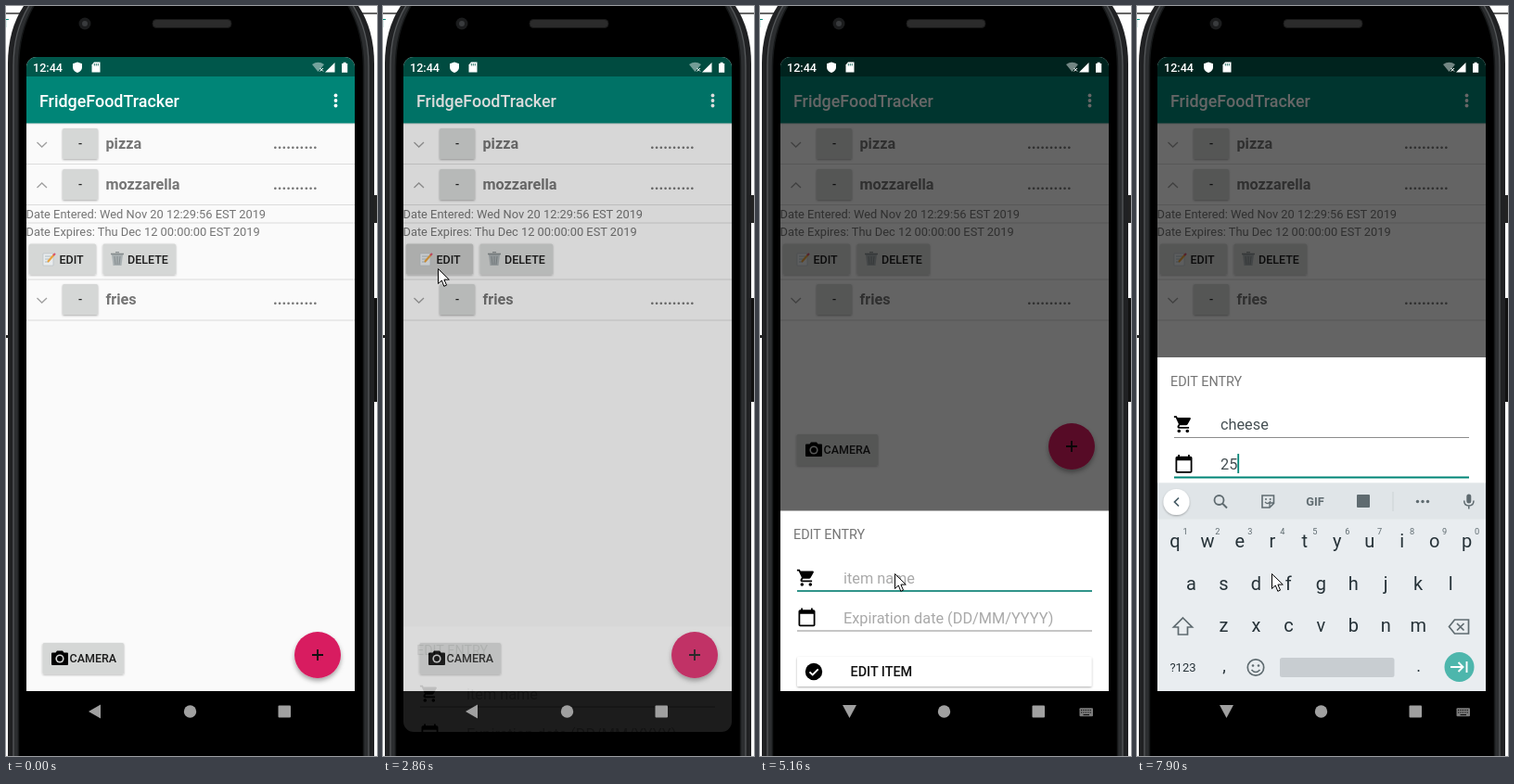
Write an HTML page that moves like this. It is 400x809 px and loops after 8000 ms.

```html
<!DOCTYPE html>
<html lang="en">
<head>
<meta charset="utf-8">
<title>Fridge list</title>
<style>
html, body { margin: 0; width: 100%; height: 100%; overflow: hidden; background: #fff; }
svg { display: block; width: 400px; height: 809px; }
text { font-family: Roboto, "Noto Sans", sans-serif; white-space: pre; }
</style>
</head>
<body>
<svg id="stage" viewBox="0 0 400 809" xmlns="http://www.w3.org/2000/svg"></svg>
<script>
const LOOP = 8000;
const KEYBOARD_HEIGHT = 225;
const stage = document.getElementById('stage');

// Markup helpers
const rect = (x, y, w, h, fill, extra = '') =>
  `<rect x="${x}" y="${y}" width="${w}" height="${h}" fill="${fill}" ${extra}/>`;
const circle = (x, y, r, fill, extra = '') =>
  `<circle cx="${x}" cy="${y}" r="${r}" fill="${fill}" ${extra}/>`;
const shape = (d, fill, extra = '') => `<path d="${d}" fill="${fill}" ${extra}/>`;
const line = (d, color, width = 1, extra = '') =>
  `<path d="${d}" fill="none" stroke="${color}" stroke-width="${width}" ${extra}/>`;
const text = (x, y, size, fill, value, extra = '') =>
  `<text x="${x}" y="${y}" font-size="${size}" fill="${fill}" ${extra}>${value}</text>`;
const group = (id, body, extra = '') => `<g id="${id}" ${extra}>${body}</g>`;
const icon = (x, y, d) => shape(d, '#000', `transform="translate(${x} ${y}) scale(.9)"`);
const BOLD = 'font-weight="700"';
const MEDIUM = 'font-weight="500"';
const CENTER = 'text-anchor="middle"';
const button = (x, y, w, h, extra = '') =>
  rect(x, y, w, h, '#d5d7d6', `rx="1.5" filter="url(#lift)" ${extra}`);

const defs = `<defs>
  <filter id="lift" x="-20%" y="-20%" width="140%" height="150%">
    <feDropShadow dx="0" dy="1" stdDeviation="0.9" flood-opacity=".32"/></filter>
  <filter id="float" x="-30%" y="-30%" width="160%" height="170%">
    <feDropShadow dx="0" dy="3" stdDeviation="2.5" flood-opacity=".35"/></filter>
  <clipPath id="display"><rect x="22" y="55" width="354" height="728" rx="11"/></clipPath>
  <clipPath id="window"><path d="M22 739V66A11 11 0 0 1 33 55H365A11 11 0 0 1 376 66V739Z"/></clipPath>
</defs>`;

function phone() {
  const outline = i =>
    `M${i} 815V${62 + i * .3}Q${i} ${22 + i * .3} ${20 + i * .9} -4` +
    `H${379 - i * .9}Q${399 - i} ${22 + i * .3} ${399 - i} ${62 + i * .3}V815Z`;
  return rect(0, 0, 400, 809, '#fff') +
    text(-4, 23, 12, '#00897b', 'T') +
    line('M0 8H400', '#333', 1.5) +
    rect(0, 355, 2, 3, '#222') + rect(397, 204, 3, 30, '#222') + rect(397, 315, 3, 112, '#111') +
    shape(outline(2), '#202123') +
    shape(outline(8), '#2c2e30', 'stroke="#55585a" stroke-width="1.3"') +
    shape(outline(13.5), '#000', 'stroke="#17191a" stroke-width="1.5"') +
    circle(85, 19, 6.5, '#1b1c1d') + circle(85, 19, 3, '#393b3d') +
    rect(158, 14.5, 85, 9, '#2b2b2b', 'rx="4" stroke="#171717"');
}

function listRow(top, name, open) {
  const y = top + 22;
  const tip = open ? -2.5 : 2.5;
  return line(`M33.5 ${y - tip + .5}L38.7 ${y + tip + .5}L44 ${y - tip + .5}`, '#a0a0a0', 1.3) +
    button(61, top + 5, 38, 33) +
    text(80, top + 26, 12.6, '#222', '-', `${MEDIUM} ${CENTER}`) +
    text(107.5, top + 27, 16.2, '#757575', name, BOLD) +
    text(288, top + 27, 16.4, '#757575', '..........', BOLD);
}

function app() {
  const dividers = [170.5, 214.5, 234, 295, 339]
    .map(y => line(`M22 ${y}H376`, '#dcdcdc', 1.2)).join('');
  const memo = shape('M40 267H51V280H40Z', '#e9ecee', 'stroke="#b9c0c4" stroke-width=".7"') +
    line('M42 270H49M42 273H48M42 276H46', '#90a4ae', .7) +
    line('M45 276L52 268', '#e9a23b', 2) + line('M51 269L53 267', '#d9536f', 2.2);
  const bin = shape('M114 268H126L124.5 280H115.5Z', '#a9b0b2') +
    line('M117 270L118 279M120 270V279M123 270L122 279', '#7d8587', .8) +
    line('M113 267.5H127', '#858c8e', 1.6) + line('M118 265.7H122', '#858c8e', 1.2);
  const cameraIcon = shape('M50 697.5H53.5L55 695.5H61L62.5 697.5H66Q67 697.5 67 698.5V710' +
    'Q67 711 66 711H50Q49 711 49 710V698.5Q49 697.5 50 697.5Z', '#000') +
    circle(58, 704, 4.6, '#d5d7d6') + circle(58, 704, 3, '#000');
  return rect(22, 55, 354, 684, '#fafafa') +
    rect(22, 55, 354, 21.5, '#00574b') + rect(22, 76, 354, 50.5, '#008577') +
    rect(22, 126.5, 354, 1, '#000', 'opacity=".12"') +
    text(36, 109, 17.9, '#fff', 'FridgeFoodTracker', MEDIUM) +
    [96.5, 102, 107.5].map(y => circle(355.5, y, 1.9, '#fff')).join('') +
    dividers + listRow(127, 'pizza') + listRow(171, 'mozzarella', true) + listRow(295, 'fries') +
    text(21.5, 229, 12.85, '#757575', 'Date Entered: Wed Nov 20 12:29:56 EST 2019') +
    text(21.5, 247.5, 12.85, '#757575', 'Date Expires: Thu Dec 12 00:00:00 EST 2019') +
    button(25, 256.5, 72, 33, 'id="edit"') + memo + text(57.5, 277.5, 12.5, '#1c1c1c', 'EDIT', MEDIUM) +
    button(104.5, 256.5, 78.5, 33) + bin + text(131, 277.5, 12.5, '#1c1c1c', 'DELETE', MEDIUM) +
    group('floating',
      button(39.5, 687, 87.5, 33.5) + cameraIcon + text(68.5, 708, 12.5, '#1c1c1c', 'CAMERA', MEDIUM) +
      circle(336, 700, 25, '#d81b60', 'filter="url(#float)"') +
      line('M330 700H342M336 694V706', '#111', 1.8));
}

function statusIcons() {
  return text(29, 70.5, 12.6, '#fff', '12:44', MEDIUM) +
    shape('M77 60.5L82 62.3V66Q82 70 77 72Q72 70 72 66V62.3Z', '#fff') +
    shape('M95 60.5H101.5V71.5H92.5V63.5Z', '#fff') +
    line('M95.3 62V64.5M97.3 62V64.5M99.3 62V64.5', '#00574b', .8) +
    shape('M330 63Q336.5 58.5 343 63L336.5 71Z', '#fff', 'opacity=".45"') +
    line('M338.5 67L342 70.5M342 67L338.5 70.5', '#fff', 1) +
    shape('M354.5 61V71.5H344Z', '#fff') +
    shape('M362 62H363.6V60.7H366.6V62H368.2V71.7H362Z', '#fff');
}

function sheet() {
  const cart = icon(39, 606, 'M1 2H4.3L5.2 4H20Q21.5 4.3 20.9 5.5L17.3 12Q16.7 13 15.5 13H8.1L7.2 14.6' +
    'V15H19V17H7Q4.4 16.6 5.2 14L6.6 11.6L3 4H1Z') +
    circle(45.3, 624, 1.8, '#000') + circle(54.3, 624, 1.8, '#000');
  const calendar = icon(39.7, 648.5, 'M20 3H19V1H17V3H7V1H5V3H4Q2 3 2 5V21Q2 23 4 23H20Q22 23 22 21V5' +
    'Q22 3 20 3ZM20 21H4V8H20Z').replace('<path', '<path fill-rule="evenodd"');
  return rect(22, 544.5, 354, 194.5, '#fff', 'id="paper"') +
    text(36, 575, 14.4, '#757575', 'EDIT ENTRY') +
    cart + text(90, 622.5, 16.3, '#a9a9a9', 'item name', 'id="name"') +
    line('M40 631H358', '#8c8c8c', 1) + line('', '#008577', 1.6, 'id="nameLine"') +
    calendar + text(90, 665.5, 16.3, '#a9a9a9', 'Expiration date (DD/MM/YYYY)', 'id="date"') +
    line('M40 674H358', '#8c8c8c', 1) + line('M40 674H358', '#008577', 2, 'id="dateLine"') +
    line('', '#4b5b60', 1, 'id="composing"') + rect(0, 605, 1.8, 21, '#008577', 'id="caret"') +
    rect(40, 702, 317.5, 32, '#fff', 'rx="1.5" filter="url(#lift)"') +
    circle(58, 718, 9.2, '#000') + line('M53.5 718.3L56.7 721.5L62.7 715.3', '#fff', 1.8) +
    text(97.5, 723, 14.4, '#111', 'EDIT ITEM', MEDIUM);
}

function keyboard() {
  const ink = '#263238', soft = '#5f6b70';
  const keys = (letters, x, y) => [...letters]
    .map((c, i) => text(x + i * 34.95, y, 20, ink, c, CENTER)).join('');
  const digits = [...'1234567890']
    .map((c, i) => text(52 + i * 34.95, 570, 9.2, soft, c, CENTER)).join('');
  const words = [100.5, 197.5, 294.5]
    .map((x, i) => text(x, 541, 16.2, '#566168', '', `id="word${i}" ${CENTER}`)).join('');
  const tools = circle(88.5, 533, 5, 'none', `stroke="${soft}" stroke-width="1.8"`) +
    line('M92 536.5L97 541.5', soft, 2) +
    shape('M135 528H147.5V536.5L143 541H135Z', 'none', `stroke="${soft}" stroke-width="1.6"`) +
    line('M147.5 536H143V541M138 535Q141 538.5 144 534', soft, 1.3) +
    circle(139, 532, 1, soft) + circle(143.7, 532, 1, soft) +
    text(192, 539, 12.8, soft, 'GIF', `${BOLD} ${CENTER}`) +
    rect(237, 527, 14, 14, soft, 'rx="1"') +
    line('M276 524V545', '#ccd2d5') +
    [302.5, 308, 313.5].map(x => circle(x, 534.5, 1.7, soft)).join('');
  return rect(22, 514.5, 354, 224.5, '#e9edf0') + rect(22, 514.5, 354, 39, '#e0e5e8') +
    circle(42.5, 535, 14, '#fff', 'filter="url(#lift)"') + line('', '#455a64', 1.7, 'id="chevron"') +
    group('suggestions', words + line('M146.5 524V545M249.5 524V545', '#c8ced1')) +
    group('tools', tools) +
    rect(355.3, 526.5, 5, 10, soft, 'rx="2.5"') +
    line('M352.7 533.5Q352.7 539 357.8 539Q363 539 363 533.5M357.8 539V542.5', soft, 1.5) +
    keys('qwertyuiop', 41, 584) + digits + keys('asdfghjkl', 58.5, 629.5) + keys('zxcvbnm', 93.5, 675) +
    shape('M49.5 660L59.5 670H54.5V678H44.5V670H39.5Z', 'none', `stroke="${soft}" stroke-width="1.7"`) +
    shape('M342.5 662H357.5V677H342.5L336.5 669.5Z', 'none', `stroke="${soft}" stroke-width="1.7"`) +
    line('M345 666L352.5 673.5M352.5 666L345 673.5', soft, 1.7) +
    text(49.5, 718, 13, ink, '?123', CENTER) + text(94, 718, 18, ink, ',', CENTER) +
    circle(128, 713.5, 8.7, 'none', `stroke="${soft}" stroke-width="1.7"`) +
    circle(125, 711.5, 1.3, soft) + circle(131, 711.5, 1.3, soft) +
    line('M123.5 716Q128 721 132.5 716', soft, 1.6) +
    rect(154, 703, 123.5, 21, '#c8cdd1', 'rx="2.5"') + text(303.5, 718, 18, ink, '.', CENTER) +
    circle(347.5, 713, 16, '#4db6ac') +
    line('M338 713H351M346.5 708L351.5 713L346.5 718M355.5 707V719', '#fff', 1.9);
}

function navigation() {
  const grey = '#a0a0a0';
  const imeKeys = line('M346 759.5H358M346 762H358', '#000', 1.2, 'stroke-dasharray="1.2 1.2"') +
    line('M348.5 764.6H355', '#000', 1);
  return shape('', grey, 'id="back"') + circle(198.5, 761, 6.7, grey) +
    rect(293.5, 754.5, 13.5, 13, grey, 'rx="1"') +
    group('ime', rect(344.5, 757.3, 14.5, 9, '#7c7c7c', 'rx="1"') + imeKeys);
}

stage.innerHTML = defs + phone() +
  group('app', app(), 'clip-path="url(#window)"') +
  group('dim', rect(22, 55, 354, 728, '#000'), 'clip-path="url(#display)"') +
  statusIcons() +
  `<g clip-path="url(#display)">${group('sheet', sheet())}</g>` +
  `<g clip-path="url(#window)">${group('keyboard', keyboard())}</g>` +
  navigation() +
  shape('M0 0V16L3.8 12.5L6.3 18.8L9 17.6L6.4 11.6H11.8Z', '#fff',
    'id="pointer" stroke="#000" stroke-width="1" stroke-linejoin="round"');

const el = {};
stage.querySelectorAll('[id]').forEach(node => { el[node.id] = node; });
const set = (id, attrs) => {
  for (const key in attrs) el[id].setAttribute(key, attrs[key]);
};
const show = (id, on) => { el[id].style.display = on ? '' : 'none'; };
const write = (id, value) => { if (el[id].textContent !== value) el[id].textContent = value; };

// Value of the latest [time, value] entry that has started
const held = (t, first, ...entries) =>
  entries.reduce((value, [start, next]) => t >= start ? next : value, first);

function glide(t, start, from, to) {
  const p = Math.min(10, Math.floor((t - start) / 77)) / 10;
  const eased = p * p * (3 - 2 * p) * .6 + p * .4;
  return from.map((v, i) => v + (to[i] - v) * eased);
}

function pointerAt(t) {
  if (t < 1370) return glide(t, 520, [284, 758], [63.5, 294]);
  if (t < 3460) return held(t, [66, 286.5], [1440, [66.5, 290]], [1840, [62, 285.5]], [1910, [59.5, 283.5]]);
  return glide(t, 3460, [59.5, 283.5], [145.5, 612.5]);
}

function drawFields(t) {
  const name = held(t, '', [5360, 'c'], [5430, 'ch'], [5540, 'che'], [5690, 'chee'], [5860, 'chees'], [6010, 'cheese']);
  const date = held(t, '', [7640, '2'], [7900, '25']);
  const onDate = t >= 6640;
  write('name', name || 'item name');
  write('date', date || 'Expiration date (DD/MM/YYYY)');
  set('name', { fill: name ? '#454f53' : '#a9a9a9' });
  set('date', { fill: date ? '#454f53' : '#a9a9a9' });

  const reach = held(t, 0, [4310, .35], [4380, .75], [4460, 1]);
  set('nameLine', {
    d: `M${150 - 110 * reach} 631H${150 + 208 * reach}`,
    'stroke-width': t >= 5300 ? 2 : 1.6
  });
  show('nameLine', reach > 0 && !onDate);
  show('dateLine', onDate);

  const typed = onDate ? date : name;
  const width = typed ? el[onDate ? 'date' : 'name'].getComputedTextLength() : 0;
  set('caret', { x: 90 + width, y: onDate ? 648.5 : 605 });
  show('caret', t >= 5300);
  set('composing', { d: `M90 625H${90 + width}` });
  show('composing', name && !onDate);
}

function drawKeyboard(t) {
  set('keyboard', {
    transform: `translate(0 ${held(t, KEYBOARD_HEIGHT, [5220, 110], [5300, 25], [5360, 0])})`
  });
  show('keyboard', t >= 5220);
  const words = held(t, '  ', [5360, 'c can call'], [5430, 'ch check chat'], [5540, 'che check cheers'],
    [5690, 'chee cheer cheese'], [5860, 'chees cheese cheesy'], [6010, 'cheese cheeses cheesecake']);
  words.split(' ').forEach((word, i) => write('word' + i, word));
  const toolbar = t < 5360 || t >= 6960;
  show('suggestions', !toolbar);
  show('tools', toolbar);
  set('tools', { opacity: t < 5360 ? 1 : held(t, 0, [6960, .3], [7040, .7], [7110, 1]) });
  set('chevron', { d: toolbar ? 'M45 530.5L40.5 535L45 539.5' : 'M40.5 530.5L45 535L40.5 539.5' });
}

function draw(t) {
  set('edit', { fill: held(t, '#d5d7d6', [2230, '#d1d3d2'], [2300, '#cdcfce'], [2380, '#cacbca'], [2450, '#c8c9c8'], [3080, '#d5d7d6']) });
  set('floating', { transform: `translate(0 ${t >= 5140 ? -KEYBOARD_HEIGHT : 0})` });
  set('dim', { opacity: held(t, 0, [2860, .14], [2930, .42], [3000, .6]) });

  const drop = held(t, 125, [2860, 125], [2930, 34], [3000, 0]);
  const pan = held(t, 0, [5220, 62], [5300, 108], [5360, 122.5], [6640, 142], [6720, 158], [6790, 165.5]);
  set('sheet', {
    transform: `translate(0 ${drop - pan})`,
    opacity: held(t, 0, [2860, .11], [2930, .72], [3000, 1])
  });
  set('paper', { height: 194.5 + pan });
  show('sheet', t >= 2860);

  drawFields(t);
  drawKeyboard(t);

  set('back', { d: t < 4820 ? 'M89 761L102 753.5V768.5Z' : 'M89 754H104L96.5 768Z' });
  show('ime', t >= 4620);
  const [x, y] = pointerAt(t);
  set('pointer', { transform: `translate(${x} ${y})` });
  show('pointer', t >= 520);
}

const begin = performance.now();
function tick() {
  draw((performance.now() - begin) % LOOP);
  requestAnimationFrame(tick);
}
tick();
</script>
</body>
</html>
```
